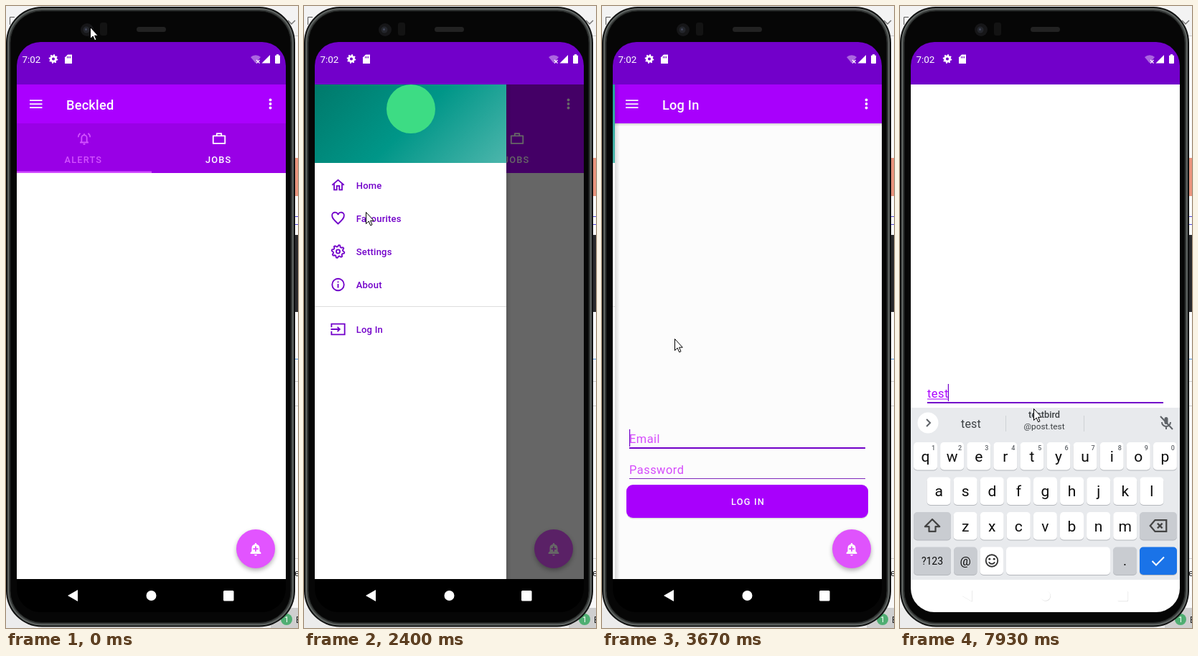
An HTML page that plays this animation: 407 px wide and 864 px high, repeating every 8 s.

```html
<!DOCTYPE html>
<html lang="en">
<head>
<meta charset="utf-8">
<title>Phone login</title>
<style>
html, body { margin: 0; width: 100%; height: 100%; overflow: hidden; background: #f3f3f3; }
svg { display: block; width: 407px; height: 864px; }
text { font-family: Roboto, sans-serif; }
.m { font-weight: 500; }
.mid { text-anchor: middle; }
</style>
</head>
<body>
<svg id="stage" viewBox="0 0 407 864" xmlns="http://www.w3.org/2000/svg"></svg>
<script>
const PURPLE = '#aa00ff', DARK = '#7200ca', PINK = '#e254ff', GREY = '#5f6368';

const text = (x, y, size, str, attrs = '') =>
  `<text x="${x}" y="${y}" font-size="${size}" ${attrs}>${str}</text>`;
const rect = (x, y, w, h, fill, rx = 0, attrs = '') =>
  `<rect x="${x}" y="${y}" width="${w}" height="${h}" fill="${fill}" rx="${rx}" ${attrs}/>`;
const circle = (x, y, r, fill, attrs = '') =>
  `<circle cx="${x}" cy="${y}" r="${r}" fill="${fill}" ${attrs}/>`;
const path = (d, attrs = '') => `<path d="${d}" ${attrs}/>`;
// 24-unit icon centred on x, y
const icon = (x, y, size, body) =>
  `<g transform="translate(${x - size / 2} ${y - size / 2}) scale(${size / 24})">${body}</g>`;
const line = c => `fill="none" stroke="${c}" stroke-width="2"`;

function gear(r) {
  let d = '';
  for (let k = 0; k < 32; k++) {
    const a = (k + 0.5) * Math.PI / 16, q = k % 4 < 2 ? r : r * 0.76;
    d += (k ? 'L' : 'M') + (12 + q * Math.cos(a)).toFixed(2) + ' ' + (12 + q * Math.sin(a)).toFixed(2);
  }
  return d + 'z';
}
const HOLE = 'M8.5 12a3.5 3.5 0 1 0 7 0a3.5 3.5 0 1 0 -7 0z';
const BELL = 'M10 20.2h4a2 2 0 0 1-4 0zM20 17.3V19H4v-1.7l2-2v-4.8A6 6 0 0 1 10.6 4.7V4a1.4 1.4 0 0 1 2.8 0v.7A6 6 0 0 1 18 10.5v4.8z';
const MIC = path('M12 4a2.5 2.5 0 0 1 2.5 2.5v5a2.5 2.5 0 0 1-5 0v-5A2.5 2.5 0 0 1 12 4z', `fill="${GREY}"`) +
  path('M6 11a6 6 0 0 0 12 0M12 17v4M4 3l17 18', line(GREY));

function backdrop() {
  return rect(0, 0, 407, 864, '#f3f3f3') + rect(396, 42, 11, 794, '#f9f9f9') +
    path('M12 15.5H5.5V26', 'fill="none" stroke="#555"') +
    path('M393 20l5 5l5-5', 'fill="none" stroke="#777" stroke-width="1.5"') +
    rect(396, 41, 11, 1, '#ccc') + rect(402, 211, 5, 53, '#e8937c') +
    rect(402, 292, 5, 1, '#5144d8') + rect(402, 303, 5, 1, '#5144d8') +
    rect(400, 318, 7, 107, '#29292c') + rect(402, 490, 5, 1, '#4b8fd6') +
    rect(402, 521, 5, 1, '#ccc') + rect(402, 555, 5, 1, '#ccc') + rect(402, 767, 5, 1, '#ccc') +
    text(402, 792, 13, 'e', 'fill="#222"') +
    rect(0, 836, 407, 28, '#ececec') + rect(369, 836, 38, 28, '#cfcfcf') +
    circle(391, 852, 8, '#4fae72') + text(391, 856, 11, '1', 'fill="#fff" class="mid"') +
    text(404, 857, 12, 'E', 'fill="#222"');
}

function phone() {
  return rect(0, 1, 403, 861.5, '#0e0f0f', 50) +
    rect(3, 4, 397, 855.5, '#3a3d3c', 47, 'stroke="#5f6462" stroke-width="2"') +
    rect(6, 7, 391, 849.5, '#060606', 44, 'stroke="#1d1f1e"') +
    circle(113, 33, 9, '#161618') + circle(112, 33, 4.5, '#24262c') + circle(111.5, 32.5, 1.5, '#43475a') +
    rect(131, 23, 10, 18, '#131313', 3) + rect(182, 29, 41, 7, '#222', 3.5);
}

function homePage() {
  const bell = path('M8 18v-7a4 4 0 0 1 8 0v7M5.5 18h13M12 4.5v2M10.5 20.5h3M3 10a8 8 0 0 1 3-6M21 10a8 8 0 0 0-3-6', line('#d352ff'));
  const bag = path('M3 8h18v11.5H3zM8.5 8V4.5h7V8', line('#fff') + ' stroke-linejoin="round"');
  return '<g id="home">' + rect(15, 109, 375, 687, '#fff') + rect(15, 163, 375, 69, PURPLE, 0, 'id="tabs"') +
    rect(15, 229.5, 188, 2.5, '#d04fff') + icon(109, 184, 22, bell) + icon(297, 184, 22, bag) +
    text(81.5, 217.5, 12.8, 'ALERTS', 'class="m" fill="#d352ff" letter-spacing="1.15"') +
    text(278, 217.5, 12.8, 'JOBS', 'class="m" fill="#fff" letter-spacing="1.15"') + '</g>';
}

function loginPage() {
  const field = 'letter-spacing=".5"';
  return '<g id="login">' + rect(15, 109, 375, 687, '#fff') + rect(15, 163, 375, 4, 'url(#drop)') +
    text(38, 606.5, 16.4, 'Email', `id="hint" fill="#d84cff" ${field}`) +
    text(38, 606.5, 16.4, '', `id="typed" fill="${PURPLE}" ${field}`) +
    rect(38, 608.5, 0, 1, PURPLE, 0, 'id="under"') + rect(38, 588, 1.2, 24, DARK, 0, 'id="caret"') +
    rect(38, 613, 329, 2, DARK) +
    text(38, 649.5, 16.4, 'Password', `fill="#d84cff" ${field}`) + rect(38, 656, 329, 1, '#8129bd') +
    rect(34, 666, 337, 46.5, '#000', 9, 'opacity=".12"') + rect(34, 665, 337, 46, PURPLE, 9) +
    text(203.5, 692.5, 12.8, 'LOG IN', 'class="m mid" fill="#fff" letter-spacing="1.15"') + '</g>';
}

function toolbar() {
  return rect(15, 109, 375, 54, PURPLE) + circle(44, 136, 16, '#fff', 'id="ripple"') +
    [130.3, 135.3, 140.3].map(y => rect(33, y, 17.5, 1.7, '#fff')).join('') +
    text(84, 143.5, 18.2, '', 'id="title" class="m" fill="#fff" letter-spacing=".2"') +
    [130.5, 136, 141.5].map(y => circle(368.5, y, 1.9, '#fff')).join('');
}

function fab() {
  return circle(348, 757, 27, '#000', 'opacity=".3" filter="url(#soft)"') + circle(348, 754, 27, PINK) +
    icon(348, 754.5, 22, path(BELL, 'fill="#fff"') + path('M12 7.5v8M8 11.5h8', line(PINK)));
}

function drawer() {
  const c = DARK;
  const items = [
    ['Home', 249, path('M3 11.8L12 4l9 7.8M6 10v9h4v-6h4v6h4v-9', line(c))],
    ['Favourites', 295, path('M12 20.2C4 13 3 11 3 8.5A4.5 4.5 0 0 1 12 6.5A4.5 4.5 0 0 1 21 8.5C21 11 20 13 12 20.2z', line(c))],
    ['Settings', 341, path(gear(9.7), line(c) + ' stroke-linejoin="round"') + circle(12, 12, 2.8, 'none', `stroke="${c}" stroke-width="2"`)],
    ['About', 387, path('M3 12a9 9 0 1 0 18 0a9 9 0 1 0-18 0M12 11v6M12 7v2', line(c))],
    ['Log In', 449, path('M2 9V4h20v16H2v-5M1 12h13M11 8.5l3.5 3.5l-3.5 3.5', line(c))]
  ];
  return '<g id="drawer">' + rect(282, 109, 7, 687, 'url(#side)') + rect(15, 109, 267, 687, '#fff') +
    rect(15, 109, 267, 109, 'url(#teal)') + circle(149, 143, 34, '#3ddc84') +
    rect(15, 417, 267, 1, '#dedede') + rect(22, 429, 253, 39, '#f2dcfd', 4, 'id="picked"') +
    items.map(([s, y, body]) => icon(47.5, y, 22, body) +
      text(72.7, y + 4.8, 13, s, `class="m" fill="${c}" letter-spacing=".23"`)).join('') + '</g>';
}

function key(x, y, w, fill, label = '', size = 21) {
  return rect(x, y + 1, w, 38.5, '#b4b7bc', 5) + rect(x, y, w, 38.5, fill, 5) +
    text(x + w / 2, y + 19.5 + size * 0.34, size, label, 'class="mid" fill="#0c0c0c"');
}

function keyboard() {
  const mod = '#c9ccd1', step = 37.1;
  const row = (letters, x, y) => [...letters].map((ch, i) => key(x + i * step, y, 33, '#fff', ch)).join('');
  const digits = [...'1234567890'].map((d, i) =>
    text(46.5 + i * step, 617, 9, d, `class="m mid" fill="${GREY}"`)).join('');
  const stroke = line(GREY);
  const tools = path('M42 574l-5 5l5 5', stroke) +
    icon(89, 579, 20, path('M4 4h16v17H4zM9 3h6v4H9zM8 11h8M8 14h8M8 17h5', stroke)) +
    icon(143, 579, 20, path(gear(11) + HOLE, `fill="${GREY}" fill-rule="evenodd"`)) +
    icon(197, 579, 20, path('M12 3a9 9 0 0 0 0 18c2 0 2-1.5 1.5-2.5c-.8-1.5 0-2.5 1.5-2.5h2a4 4 0 0 0 4-4C21 6 17 3 12 3z', `fill="${GREY}"`) +
      [[6.5, 11], [9.5, 7], [14.5, 7], [17.5, 11]].map(p => circle(...p, 1.5, '#e8eaed')).join('')) +
    icon(250, 579, 20, path('M20 11V4H4v16h9M11 11l9 4l-4 1.5l-1.5 4z', stroke)) +
    rect(283, 569, 1, 21, '#cfd2d6') + [311, 317, 323].map(x => circle(x, 579, 1.9, GREY)).join('');
  const hints = path('M37 574l5 5l-5 5', stroke) + text(99, 585.5, 16, '', 'id="word" class="mid" fill="#3c4043" letter-spacing=".2"') +
    '<g id="offer">' + rect(147, 569, 1, 22, '#cfd2d6') + rect(256, 569, 1, 22, '#cfd2d6') +
    text(201, 572, 12.8, 'testbird', 'class="m mid" fill="#3c4043"') +
    text(201, 588, 11.8, '@post.test', 'class="mid" fill="#3c4043"') + '</g>';
  return '<g id="keys">' + rect(15, 558, 375, 239, '#e8eaed') + rect(15, 797, 375, 60, '#fff') +
    circle(39, 579, 14.5, '#fff') + `<g id="tools">${tools}</g><g id="hints">${hints}</g>` + icon(371, 579, 24, MIC) +
    row('qwertyuiop', 19, 606) + digits + row('asdfghjkl', 37.6, 654.5) + row('zxcvbnm', 74.6, 703) +
    key(19, 703, 52, mod) + icon(45, 722, 27, path('M12 4L3 13h5v6h8v-6h5z', line('#444') + ' stroke-linejoin="round"')) +
    key(334, 703, 52, mod) + icon(360, 722, 27, path('M8 5h14v14H8l-6-7zM11 9l6 6M17 9l-6 6', line('#444'))) +
    key(19, 751.5, 52, mod, '?123', 14) + key(75, 751.5, 32.5, mod, '@', 17) + key(111.5, 751.5, 32.5, '#fff') +
    icon(128, 770.5, 22, path('M3 12a9 9 0 1 0 18 0a9 9 0 1 0-18 0M7.5 14a5 5 0 0 0 9 0', line('#333')) +
      circle(8.5, 9.5, 1.6, '#333') + circle(15.5, 9.5, 1.6, '#333')) +
    key(148, 751.5, 145, '#fff') + key(297, 751.5, 33, mod, '.', 19) + key(334, 751.5, 52, '#1a73e8') +
    path('M351.5 771l5.5 5.5l11-11', 'fill="none" stroke="#fff" stroke-width="2"') + '</g>';
}

function statusBar() {
  return rect(15, 50, 375, 59, DARK) + text(22.5, 78.7, 13.4, '7:02', 'fill="#fff"') +
    icon(66, 73.5, 14, path(gear(11) + HOLE, 'fill="#fff" fill-rule="evenodd"')) +
    path('M86 67.5h6v12.5h-10v-8.5z', 'fill="#fff"') +
    path('M85.5 70v2.5M87.5 70v2.5M89.5 70v2.5', `stroke="${DARK}"`) +
    path('M341 71a10 10 0 0 1 14 0l-7 8.5z', 'fill="#fff" opacity=".4"') +
    path('M349 75l4.5 4.5M353.5 75l-4.5 4.5', 'stroke="#fff" stroke-width="1.2"') +
    path('M356.5 79.5h11.5v-11.5z', 'fill="#fff"') +
    rect(375, 68.5, 7, 11.5, '#fff', 1) + rect(377, 67, 3, 2, '#fff');
}

// White buttons whose faint shadow only shows on a light background
function navBar() {
  const shapes = path('M86 819l14-8v16z') + '<circle cx="202.5" cy="819" r="7"/>' +
    '<rect x="303" y="812" width="14.5" height="14.5" rx="1.5"/>';
  return `<g opacity=".12" transform="translate(.6 .8)">${shapes}</g><g fill="#fff">${shapes}</g>`;
}

const stops = (...cs) => cs.map(([o, c, a = 1]) => `<stop offset="${o}" stop-color="${c}" stop-opacity="${a}"/>`).join('');
document.getElementById('stage').innerHTML = `<defs>
  <clipPath id="screen">${rect(15, 50, 375, 792, '#000', 33)}</clipPath>
  <clipPath id="body">${rect(15, 109, 375, 733, '#000')}</clipPath>
  <linearGradient id="teal" gradientUnits="userSpaceOnUse" x1="54.5" y1="69.5" x2="242.5" y2="257.5">${stops([0, '#00796b'], [0.5, '#009688'], [1, '#4db6ac'])}</linearGradient>
  <linearGradient id="side">${stops([0, '#000', 0.14], [1, '#000', 0])}</linearGradient>
  <linearGradient id="drop" x2="0" y2="1">${stops([0, '#000', 0.16], [1, '#000', 0])}</linearGradient>
  <filter id="soft" x="-30%" y="-30%" width="160%" height="160%"><feGaussianBlur stdDeviation="3"/></filter>
</defs>` + backdrop() + phone() +
  `<g clip-path="url(#screen)">` + rect(15, 50, 375, 792, '#000') +
  `<g clip-path="url(#body)"><g id="app">` + homePage() + loginPage() + toolbar() + fab() +
  rect(15, 109, 375, 687, '#000', 0, 'id="scrim"') + drawer() + '</g>' + keyboard() + '</g>' + statusBar() + navBar() + '</g>' +
  path('M.5 .5V16.5L4.2 13L6.7 18.8L9 17.8L6.6 12.2H11.3z', 'id="cursor" fill="#fff" stroke="#000"');

// Tracks: [tick, value...], 15 ticks per second
const CURSOR = [[3, 117, 28.5], [15, 45, 134], [31, 45, 134], [36, 86, 286], [41, 93, 473], [43, 92, 473], [46, 91, 449],
  [53, 91, 449], [55, 101, 462], [63, 155, 544], [65, 150, 553], [115, 150, 553], [119, 186, 559]];
const DRAWER = [[22, 0], [23, 30], [24, 92], [25, 162], [26, 216], [27, 249], [28, 264], [29, 267],
  [51, 267], [52, 150], [53, 56], [54, 18], [55, 3], [56, 0]];
const PAN = [[81, 0], [82, 7], [83, 22], [84, 42], [85, 56], [86, 62], [87, 63]];
const RISE = [[80, 284], [82, 160], [83, 95], [84, 45], [85, 15], [86, 3], [87, 0]];
const FADE = [[80, 0], [82, 0.35], [85, 1]];
const RIPPLE = [[21, 0], [22, 0.1], [25, 0.1], [27, 0]];
const CARET_X = [38, 43, 52.6, 61.5, 66.8];

function at(track, n) {
  if (n <= track[0][0]) return track[0].slice(1);
  const i = track.findIndex(p => p[0] >= n);
  if (i < 0) return track[track.length - 1].slice(1);
  const a = track[i - 1], b = track[i], k = (n - a[0]) / (b[0] - a[0]);
  return a.slice(1).map((v, j) => v + (b[j + 1] - v) * k);
}
// How many of the given ticks have passed
const passed = (n, ...ticks) => ticks.filter(t => n >= t).length;

const el = {};
document.querySelectorAll('#stage [id]').forEach(e => el[e.id] = e);
const show = (e, on) => e.setAttribute('visibility', on ? 'inherit' : 'hidden');
const move = (e, x, y) => e.setAttribute('transform', `translate(${x} ${y})`);

function draw(n) {
  const [cx, cy] = at(CURSOR, n), [open] = at(DRAWER, n), [fade] = at(FADE, n);
  const login = n >= 52, count = passed(n, 81, 85, 104, 109);
  move(el.cursor, Math.round(cx), Math.round(cy));
  move(el.drawer, Math.round(open) - 267, 0);
  show(el.drawer, open > 0);
  show(el.picked, n >= 51);
  el.scrim.setAttribute('opacity', 0.6 * Math.pow(open / 267, 0.85));
  el.ripple.setAttribute('opacity', at(RIPPLE, n)[0]);
  el.tabs.setAttribute('fill', n < 19 ? '#9900e6' : PURPLE);
  show(el.home, !login);
  show(el.login, login);
  el.title.textContent = login ? 'Log In' : 'Beckled';

  show(el.hint, login && !count);
  el.typed.textContent = 'test'.slice(0, count);
  const ul = passed(n, 86, 107, 113);
  el.under.setAttribute('width', ul ? CARET_X[ul + 1] - 38 : 0);
  el.caret.setAttribute('x', CARET_X[count]);
  show(el.caret, login && passed(n, 60, 67, 75, 81, 97, 104) % 2 === 0);

  move(el.app, 0, -at(PAN, n)[0]);
  move(el.keys, 0, at(RISE, n)[0]);
  el.keys.setAttribute('opacity', fade);
  show(el.tools, n < 86);
  show(el.hints, n >= 86);
  show(el.offer, n >= 107);
  el.word.textContent = 'test'.slice(0, 2 + passed(n, 107, 113));
}

const start = performance.now();
function tick() {
  const t = (performance.now() - start) % 8000;
  // The small lead absorbs tick times rounded down to 10 ms
  draw(Math.floor(t * 0.015 + 0.06) % 120);
  requestAnimationFrame(tick);
}
tick();
</script>
</body>
</html>
```
